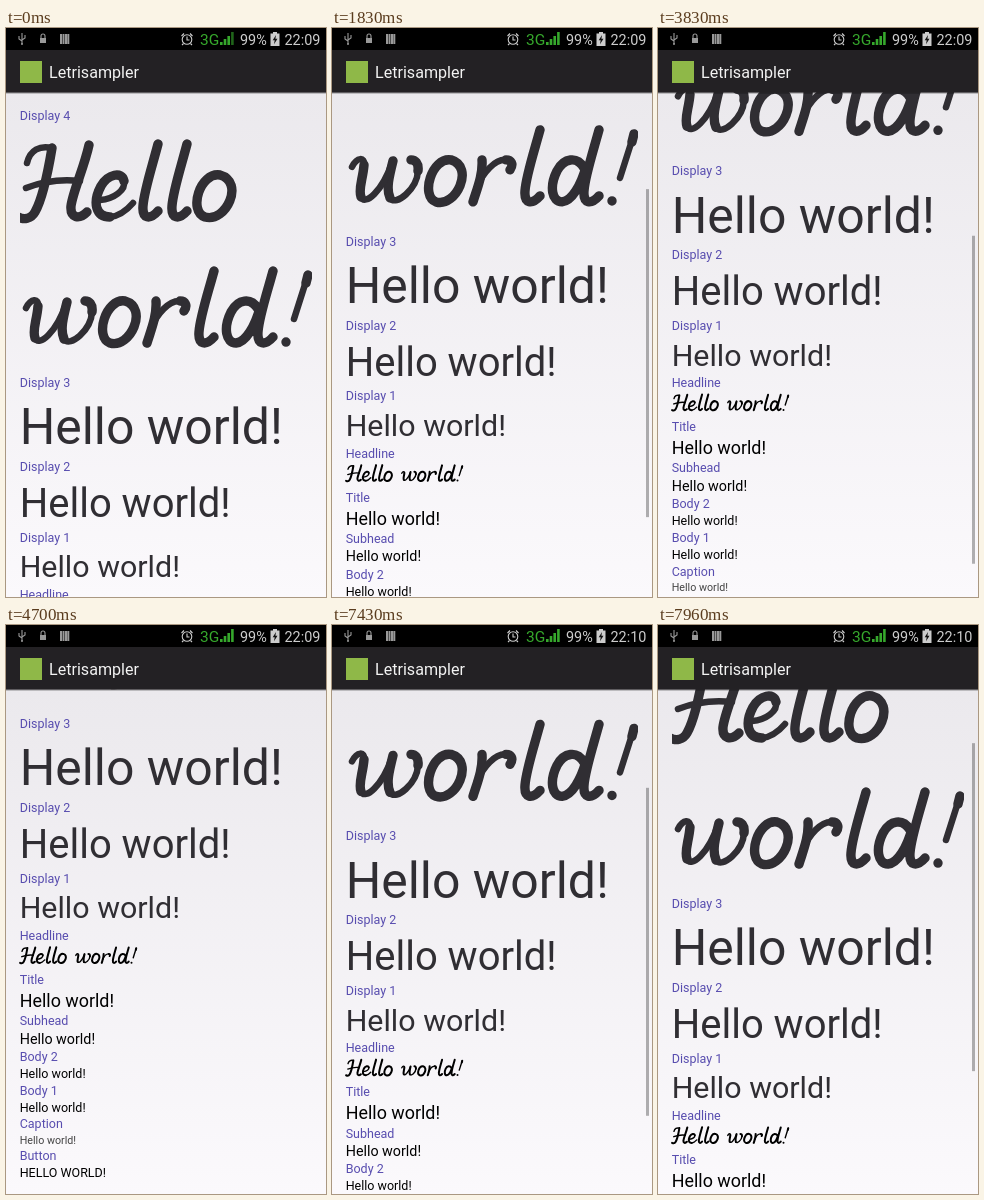
An HTML page for the animation above (8000 ms loop, 320 px wide and 569 px high).

```html
<!DOCTYPE html>
<html lang="en">
<head>
<meta charset="utf-8">
<title>Type scale scrolling</title>
<style>
  html, body { margin: 0; width: 100%; height: 100%; overflow: hidden; background: #000; }
  svg { display: block; width: 100vw; height: 100vh; font-family: Roboto, sans-serif; }
  .label { fill: #584daf; font-size: 12.5px; }
  .script { fill: none; stroke: currentColor; stroke-width: 9.4; stroke-linecap: round; stroke-linejoin: round; }
  .thin { stroke-width: 6.5; }
</style>
</head>
<body>
<svg viewBox="0 0 320 569" preserveAspectRatio="none">
  <defs>
    <linearGradient id="page" x2="0" y2="1">
      <stop stop-color="#e9e7eb"/><stop offset="1" stop-color="#fbf9fc"/>
    </linearGradient>
    <linearGradient id="edge" x2="0" y2="1">
      <stop stop-color="#33b5e5" stop-opacity="0"/><stop offset="1" stop-color="#33b5e5"/>
    </linearGradient>
    <clipPath id="column"><path d="M14 0H306V900H14Z"/></clipPath>
    <g id="hello">
      <path d="M46 120C42 144 37 170 29 184C25 191 18 192 12 189M83 117C78 140 67 163 65 178C64 190 73 192 81 184
        M152 116C146 139 138 163 137 178C136 191 144 192 152 183M181 116C175 139 167 163 166 178C165 191 173 192 181 183
        M118 153C116 143 102 146 95 158C86 175 90 189 104 189
        M214 147C194 144 182 183 199 189C220 195 239 154 214 147Z"/>
      <path class="thin" d="M21 135C24 122 34 117 46 120M20 160C38 153 56 151 74 153
        M94 172C108 171 120 162 118 153M104 189C113 188 121 182 127 175"/>
    </g>
    <g id="world">
      <path d="M32 278C31 292 26 302 29 310M61 274C57 290 54 302 58 311M86 284C87 276 83 273 79 273
        M119 273C100 270 88 309 104 315C124 321 143 280 119 273Z
        M150 273C151 288 145 302 141 315M178 283C182 277 179 273 174 273
        M208 243C202 265 194 289 193 304C192 317 200 318 208 309
        M252 281C245 269 232 271 225 284C217 300 220 315 230 315C240 314 249 298 254 280
        M267 243C261 265 253 289 252 304C251 317 259 318 267 309
        M302 247L300 255M280 314L280 314.1"/>
      <path class="thin" d="M20 280C25 270 33 270 32 278M29 310C33 319 50 305 60 276M58 311C64 320 85 302 86 284
        M145 300C151 286 163 272 174 273M302 247L288 291"/>
    </g>
  </defs>

  <rect width="320" height="569" fill="url(#page)"/>
  <g id="list">
    <g class="script" color="#302e33" clip-path="url(#column)" role="img" aria-label="Hello world!">
      <use href="#hello"/><use href="#world"/>
    </g>
    <g class="script" color="#000" transform="translate(11.5 553.4) scale(.2143)" role="img" aria-label="Hello world!">
      <use href="#hello"/><use href="#world" x="252" y="-126"/>
    </g>
  </g>
  <rect id="glow" y="557" width="320" height="12" fill="url(#edge)"/>
  <rect id="thumb" x="314" width="3" height="328" fill="#000"/>

  <rect width="320" height="22"/>
  <rect y="64" width="320" height="2" opacity=".2"/>
  <rect y="22" width="320" height="42.6" fill="#232124"/>
  <rect x="14" y="33" width="22" height="22" fill="#8fb848"/>
  <text x="43" y="50" font-size="16.1" fill="#f3f3f3">Letrisampler</text>

  <g fill="none" stroke="#999" stroke-width="1.1">
    <path d="M16 5V16M16 13L13 11V8M16 12L19 10V7"/>
    <path d="M35 10V8a2 2 0 0 1 4 0V10"/>
    <path d="M55 6V16M57.5 6V16M60 6V16M62.3 6V16" stroke-width="2"/>
    <g stroke="#ccc">
      <circle cx="181" cy="11.5" r="4.8"/>
      <path d="M181 8.5V12H183.5M175.5 8L178 5.5M186.5 8L184 5.5M177.5 15.5L176 17M184.5 15.5L186 17"/>
    </g>
  </g>
  <path d="M34 10H40V15H34ZM15 16a1 1 0 0 1 2 0a1 1 0 0 1-2 0" fill="#999"/>
  <path d="M214 14H216.6V17H214ZM217.7 11H220.3V17H217.7ZM221.4 8H224V17H221.4Z" fill="#36a82c"/>
  <path id="topBar" d="M225.1 4H227.7V17H225.1Z" fill="#36a82c"/>
  <path d="M267 4H271V5.5H273.5V18H264.5V5.5H267Z" fill="#ccc"/>
  <path d="M270 7L266.7 12.3H268.7L268 16.3L271.5 10.8H269.4Z" fill="#111"/>
  <text x="194" y="17" font-size="15.5" fill="#36a82c">3G</text>
  <g font-size="14.4" fill="#ccc">
    <text x="234" y="17">99%</text>
    <text id="clock" x="278.5" y="17"></text>
  </g>
</svg>
<script>
const $ = id => document.getElementById(id);
const LOOP = 8000, STEP = 1000 / 15, LEAD = 24;

// label, its baseline, sample font size, sample baseline, colour
const dark = '#302e33';
const rows = [
  ['Display 4', 92], ['Display 3', 359, 49.9, 416.3, dark], ['Display 2', 443, 40, 489, dark],
  ['Display 1', 513.5, 30.4, 549.3, dark], ['Headline', 571], ['Title', 614.7, 17.9, 638, '#000'],
  ['Subhead', 656.2, 14.3, 674.5, '#000'], ['Body 2', 692, 12.5, 709, '#000'],
  ['Body 1', 725.7, 12.5, 742.6, '#000'], ['Caption', 759.3, 10.7, 774.5, '#444'],
  ['Button', 791.3, 12.5, 808, '#000'],
];

function addText(text, y, attrs) {
  const el = document.createElementNS('http://www.w3.org/2000/svg', 'text');
  el.textContent = text;
  for (const [key, value] of Object.entries({ x: 13.7, y, ...attrs })) el.setAttribute(key, value);
  $('list').append(el);
}

for (const [label, y, size, sampleY, fill] of rows) {
  addText(label, y, { class: 'label' });
  if (size) addText(label === 'Button' ? 'HELLO WORLD!' : 'Hello world!', sampleY, { 'font-size': size, fill });
}

// first step, last step, scroll from, scroll to, ease-out power
const moves = [
  [18, 21, 0, 54, 1.2], [24, 31, 54, 184, 1.6], [57, 59, 184, 256, 1.2],
  [100, 104, 256, 169, 1.9], [109, 119, 169, 76, 1],
];
const clamp = v => Math.min(1, Math.max(0, v));
const progress = (n, first, last) => clamp((n - first + 1) / (last - first + 1));

function scrollAt(n) {
  return moves.reduce((pos, [first, last, from, to, power]) =>
    n < first ? pos : from + (to - from) * (1 - (1 - progress(n, first, last)) ** power), 0);
}

function thumbAlpha(n) {
  if (n < 18) return 0;
  if (n < 57) return 1 - progress(n, 37, 40);
  if (n < 100) return 1 - progress(n, 63, 67);
  return 1;
}

function draw(now) {
  const n = Math.floor((now % LOOP - LEAD) / STEP);
  const scroll = scrollAt(n);
  $('list').setAttribute('transform', `translate(0 ${-scroll})`);
  $('thumb').setAttribute('y', 68 + scroll * 0.66);
  $('thumb').setAttribute('opacity', 0.3 * thumbAlpha(n));
  $('glow').setAttribute('opacity', n < 58 || n > 69 ? 0 : 0.3 * (1 - progress(n, 62, 69)));
  $('topBar').setAttribute('opacity', n < 7 ? 0.6 : 1);
  $('clock').textContent = n < 102 ? '22:09' : '22:10';
}

const start = performance.now();
(function tick() {
  draw(performance.now() - start);
  requestAnimationFrame(tick);
})();
</script>
</body>
</html>
```
